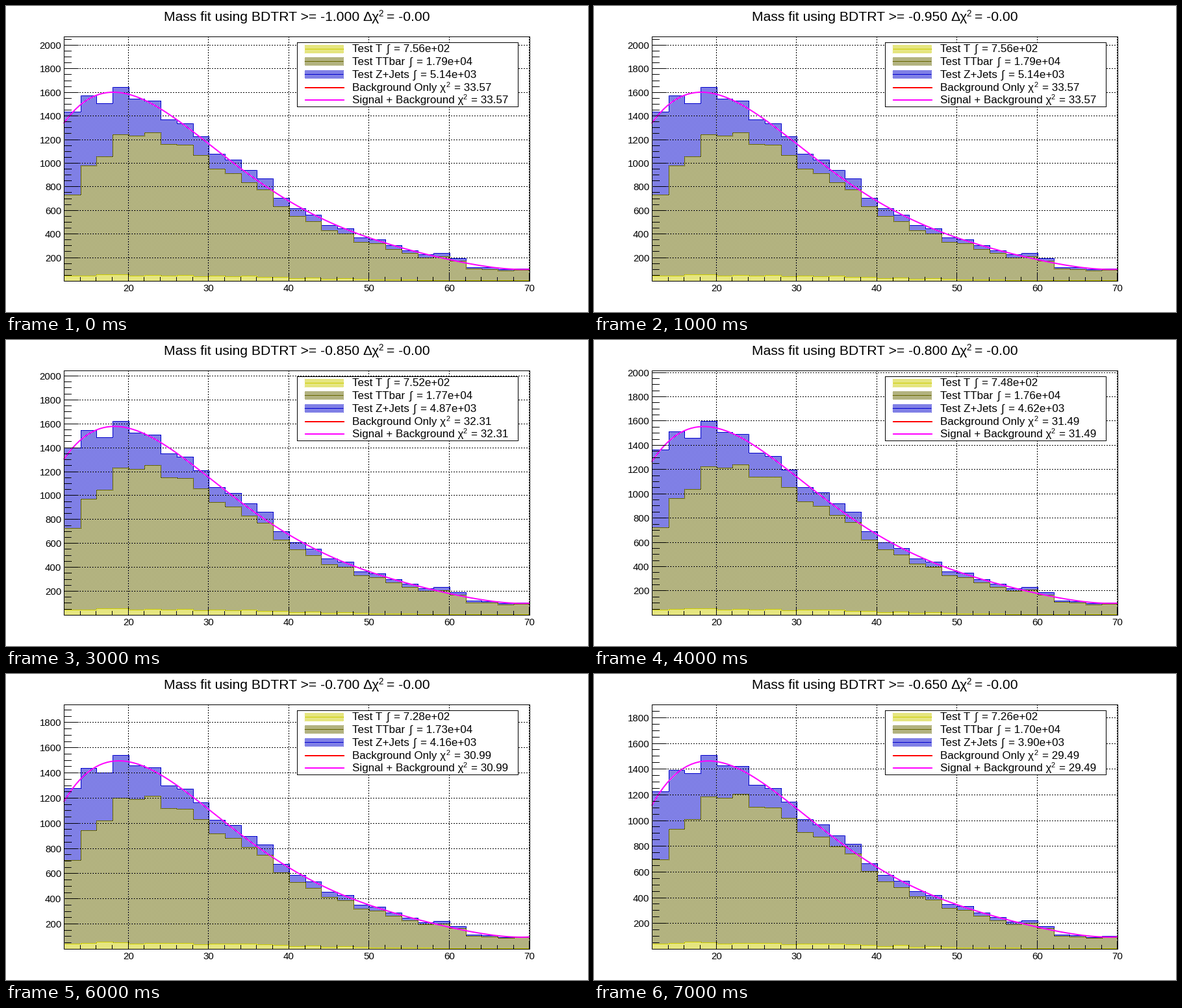
These frames come from a looping animation (896 px wide and 472 px high, 8000 ms). A matplotlib script:

```python
import numpy as np
import matplotlib.pyplot as plt
from matplotlib.animation import FuncAnimation
from matplotlib.collections import LineCollection
from matplotlib.patches import Rectangle

W, H, DPI = 896, 472, 64
PX = 72 / DPI                                   # points per pixel
LEFT, RIGHT, TOP, BASE = 89, 806, 47, 424
ZERO = 424.4
BIN_W = 24.71
YELLOW, OLIVE, BLUE = (204, 204, 0), (102, 102, 0), (0, 0, 204)

# Bin contents before any cut, 12 to 70 in steps of 2
EVENTS = np.array([1436, 1576, 1510, 1644, 1546, 1527, 1368, 1340, 1225, 1079,
                   1032, 942, 870, 708, 615, 563, 477, 450, 370, 354, 304, 263,
                   225, 236, 192, 120, 115, 101, 107])
MASS = 13 + 2 * np.arange(len(EVENTS))
NORM = (MASS - 41) / 29

# Legend readouts, one per cut
INT_T = [7.56, 7.56, 7.56, 7.52, 7.48, 7.40, 7.28, 7.26]
INT_TT = [1.79, 1.79, 1.78, 1.77, 1.76, 1.75, 1.73, 1.70]
INT_Z = [5.14, 5.14, 5.11, 4.87, 4.62, 4.43, 4.16, 3.90]
CHI2 = [33.57, 33.57, 33.13, 32.31, 31.49, 30.54, 30.99, 29.49]

# Shape of each sample as a function of mass
KEPT = 0.94 - 0.085 * np.exp(-(MASS - 13) / 4.5)
TTBAR = EVENTS * (0.9 - 0.39 * np.exp(-(MASS - 13) / 6))
NOISE = np.random.default_rng(4).normal(1, 0.1, len(MASS))
SINGLE_T = 48 * np.exp(-((MASS - 21) / 25) ** 2) * NOISE + 4

Y, X = np.mgrid[:H, :W]
CHECKER = (X + Y) % 2 == 0
INSIDE = (X >= LEFT) & (X < RIGHT) & (Y < BASE)
BIN_OF = np.clip((X[0] - 89.4) / BIN_W, 0, len(MASS) - 1).astype(int)


def x_px(v):
    return 89.4 + (v - 12) * BIN_W / 2


def y_px(v, ymax):
    return ZERO - v * 377 / ymax


def stipple(canvas, area, color):
    canvas[area] = (255, 255, 255, 255)
    canvas[area & CHECKER, :3] = color


def paint_hist(canvas, values, ymax, color):
    """Fill one stacked histogram with a stipple and trace its outline."""
    top = np.rint(y_px(values, ymax)).astype(int)[BIN_OF]
    prev = np.r_[top[:1], top[:-1]]
    stipple(canvas, INSIDE & (Y >= top), color)
    edge = INSIDE & (Y >= np.minimum(top, prev)) & (Y <= np.maximum(top, prev))
    canvas[edge] = (*color, 255)


fig = plt.figure(figsize=(W / DPI, H / DPI), dpi=DPI, facecolor="white")
ax = fig.add_axes([0, 0, 1, 1])
ax.axis("off")


def show(pixels, z):
    return ax.imshow(pixels, extent=(0, W, H, 0), interpolation="nearest",
                     aspect="auto", zorder=z)


def label(x, y, s, size, ha="left"):
    return ax.text(x, y, s, fontsize=size * PX, family="Liberation Sans",
                   ha=ha, va="baseline", color="black", zorder=9)


def lines(z, **kw):
    coll = LineCollection([], colors="black", linewidths=PX,
                          antialiaseds=False, zorder=z, **kw)
    ax.add_collection(coll)
    return coll


def box(x0, y0, x1, y1, z, face):
    # Whole coordinates: snapping moves the stroke to the pixel centre
    ax.add_patch(Rectangle((x0, y0), x1 - x0, y1 - y0, fc=face,
                           ec="black", lw=PX, antialiased=False, zorder=z))


blank = np.zeros((H, W, 4), np.uint8)
stack = show(blank, 1)
grid = lines(2, linestyles=[(0, (1, 2))])
ticks = lines(4)
curve, = ax.plot([], [], color="#ff00ff", lw=2 * PX, zorder=3)
box(LEFT, TOP, RIGHT, BASE, 4, "none")

# Horizontal axis
x_grid, x_ticks = [], []
for v in range(12, 71, 2):
    x = int(x_px(v))
    major = v % 10 == 0
    x_ticks.append([(x, BASE), (x, BASE - (11 if major else 6))])
    if major:
        x_grid.append([(x, BASE), (x, TOP)])
        label(x_px(v), 440, str(v), 15, "center")
y_labels = [label(85.5, 0, str(v), 15, "right") for v in range(200, 2001, 200)]

# Legend
box(448, 56, 788, 155, 5, "white")
swatches = blank.copy()
for row, color in ((66, YELLOW), (85, OLIVE), (105, BLUE)):
    stipple(swatches, (X >= 460) & (X < 520) & (abs(Y - row) <= 6), color)
    swatches[row, 460:520] = (*color, 255)
show(swatches, 6)
for row, color in ((125.5, "#ff0000"), (145, "#ff00ff")):
    ax.plot([460, 521], [row, row], color=color, lw=2 * PX, zorder=6,
            solid_capstyle="butt")

sums = []
for y, name, x_int, x_end in ((71.3, "Test T", 586, 683),
                              (91, "Test TTbar", 621, 718),
                              (110.8, "Test Z+Jets", 627, 724)):
    label(533, y, name, 17)
    label(x_int, y, "∫", 17)
    sums.append(label(x_end, y, "", 17, "right"))

chis = []
for y, name, x_sup, x_end in ((130.6, "Background Only χ", 677, 747),
                              (150.4, "Signal + Background χ", 703, 773)):
    label(533, y, name, 17)
    label(x_sup, y - 6, "2", 11)
    chis.append(label(x_end, y, "", 17, "right"))

# Title
title = label(243, 23.3, "", 21.1)
label(549, 23.3, "Δχ", 21.1)
label(573.5, 15.5, "2", 13.5)
label(653, 23.3, "= -0.00", 21.1, "right")

ax.set_xlim(0, W)
ax.set_ylim(H, 0)


def draw(i):
    # The cut bites late and then ever harder
    cut = (max(0, i - 1.6) / 5.4) ** 1.35
    total = EVENTS * (1 - cut * (1 - KEPT))
    ymax = 1.26 * total.max()

    canvas = blank.copy()
    paint_hist(canvas, total, ymax, BLUE)
    paint_hist(canvas, TTBAR * (1 - 0.045 * cut), ymax, OLIVE)
    paint_hist(canvas, SINGLE_T * (1 - 0.04 * cut), ymax, YELLOW)
    stack.set_data(canvas)

    fit = np.polyfit(NORM, total, 5, w=1 / np.sqrt(total))
    t = np.linspace(-1, 1, 120)
    curve.set_data(x_px(41 + 29 * t), y_px(np.polyval(fit, t), ymax))

    y_grid, y_ticks = [], []
    for v in range(50, int(ymax), 50):
        y = int(y_px(v, ymax))
        major = v % 200 == 0
        y_ticks.append([(LEFT, y), (LEFT + (22 if major else 11), y)])
        if major:
            y_grid.append([(LEFT, y), (RIGHT, y)])
    grid.set_segments(x_grid + y_grid)
    ticks.set_segments(x_ticks + y_ticks)
    for k, text in enumerate(y_labels, 1):
        text.set_visible(200 * k < ymax)
        text.set_y(y_px(200 * k, ymax) + 5.5)

    title.set_text(f"Mass fit using BDTRT >= {-1 + 0.05 * i:.3f}")
    sums[0].set_text(f"= {INT_T[i]:.2f}e+02")
    sums[1].set_text(f"= {INT_TT[i]:.2f}e+04")
    sums[2].set_text(f"= {INT_Z[i]:.2f}e+03")
    for text in chis:
        text.set_text(f"= {CHI2[i]:.2f}")
    return []


anim = FuncAnimation(fig, draw, frames=8, interval=1000, repeat=True,
                     repeat_delay=0, blit=False)
plt.show()
```
